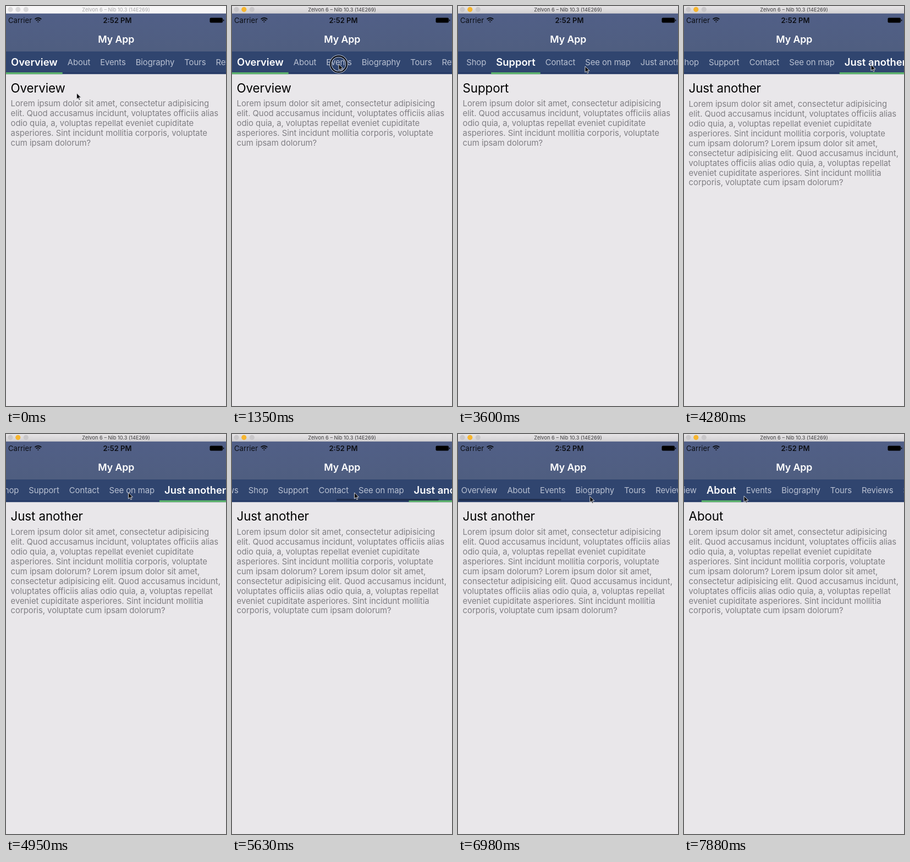
An HTML page for the animation above (8 s loop, 400 by 730 pixels).

```html
<!DOCTYPE html>
<html lang="en">
<head>
<meta charset="utf-8">
<title>Scrolling tabs</title>
<style>
  html, body { margin: 0; width: 100%; height: 100%; overflow: hidden; background: #e9e7ea; }
  svg { display: block; width: 100%; height: 100%; font-family: Inter, "Noto Sans", sans-serif; }
  .mid { text-anchor: middle; }
  .tab { font-size: 14.9px; letter-spacing: -.1px; fill: #b9c1d2; }
  .tab.on { font-size: 18.4px; font-weight: 600; letter-spacing: 0; fill: #fff; }
  .body { font-size: 14.9px; letter-spacing: -.05px; fill: #807f84; }
  .status { font-size: 13px; fill: #0b0d12; }
</style>
</head>
<body>
<svg viewBox="0 0 400 730">
  <defs>
    <linearGradient id="chrome" x2="0" y2="1">
      <stop stop-color="#e6e4e6"/><stop offset="1" stop-color="#d1cfd1"/>
    </linearGradient>
    <linearGradient id="nav" x2="0" y2="1">
      <stop stop-color="#515f87"/><stop offset="1" stop-color="#4f5e80"/>
    </linearGradient>
  </defs>

  <rect width="400" height="730" fill="#e9e7ea"/>
  <rect id="bar" width="400" height="14"/>
  <g id="lights"><circle cx="8" cy="6.3" r="4.6"/><circle cx="21.8" cy="6.3" r="4.6"/><circle cx="36.3" cy="6.3" r="4.6"/></g>
  <text id="window" class="mid" x="200" y="10" font-size="9.2">Zelvon 6 – Nib 10.3 (14E269)</text>

  <rect y="13.7" width="400" height="69.3" fill="url(#nav)"/>
  <text class="status" x="4" y="30.5" letter-spacing=".1">Carrier</text>
  <g fill="none" stroke="#0b0d12" stroke-width="1.9">
    <path d="M52.5 24.2a8.2 8.2 0 0 1 11.8 0M54.8 26.7a5 5 0 0 1 7.2 0"/>
    <path d="M56.7 28.3L58.4 30.3L60.1 28.3Z" fill="#0b0d12" stroke="none"/>
  </g>
  <text class="status mid" x="202.5" y="30.5" font-weight="600">2:52 PM</text>
  <rect x="370.5" y="21.5" width="23.5" height="9" rx="2"/>
  <rect x="394.8" y="24.4" width="1.5" height="3.4" rx=".7"/>
  <text class="mid" x="200.3" y="66.5" font-size="17.8" font-weight="600" letter-spacing="-.1" fill="#fff">My App</text>

  <rect y="83" width="400" height="41" fill="#30456f"/>
  <rect y="121.3" width="400" height="3" fill="#253a66"/>
  <g id="tabs"><rect id="underline" y="121" height="3.3" fill="#5bb36b"/></g>
  <rect id="indicator" y="118.6" height="2.8" rx="1.4" fill="#18243f"/>

  <text id="heading" x="8.6" y="158.3" font-size="22.4" letter-spacing="-.12"></text>
  <g id="lines"></g>

  <g id="cursor">
    <g id="ring" fill="none">
      <circle r="14.6" stroke="#dfe3ec" stroke-width="4.2"/>
      <circle r="14.6" stroke="#0c111c" stroke-width="2.6"/>
    </g>
    <path d="M0 0V11.2L2.6 8.8L4.4 12.8L6.2 12L4.4 8.1H8Z" fill="#0a0a0c" stroke="#e6e6ea" stroke-width=".9"/>
  </g>
</svg>
<script>
const LOOP = 8000, STEP = 225, WIDTH = 400, PAD = 9;

const TABS = ['Overview', 'About', 'Events', 'Biography', 'Tours', 'Reviews',
  'Shop', 'Support', 'Contact', 'See on map', 'Just another'];
const SHORT = [
  'Lorem ipsum dolor sit amet, consectetur adipisicing',
  'elit. Quod accusamus incidunt, voluptates officiis alias',
  'odio quia, a, voluptas repellat eveniet cupiditate',
  'asperiores. Sint incidunt mollitia corporis, voluptate',
  'cum ipsam dolorum?',
];
const LONG = [
  ...SHORT.slice(0, 4),
  'cum ipsam dolorum? Lorem ipsum dolor sit amet,',
  'consectetur adipisicing elit. Quod accusamus incidunt,',
  'voluptates officiis alias odio quia, a, voluptas repellat',
  'eveniet cupiditate asperiores. Sint incidunt mollitia',
  'corporis, voluptate cum ipsam dolorum?',
];

// Where the pointer is at each step, and what it does there
const STORY = [
  { step: 0, x: 128.5, y: 159 },
  { step: 2, x: 112, y: 172 },
  { step: 6.5, x: 194, y: 106, click: 'Events' },
  { step: 11.5, x: 191.5, y: 108, click: 'Tours' },
  { step: 14.5, x: 231, y: 110, click: 'Support' },
  { step: 18.5, x: 340, y: 107, click: 'Just another' },
  { step: 23.5, x: 222.5, y: 107, dragTo: 'Overview' },
  { step: 28, x: 302, y: 114 },
  { step: 33.84, x: 109, y: 113, click: 'About' },
];
const CLICK_SPAN = 2, DRAG_SPAN = 7.9;
const drag = STORY.find(s => s.dragTo);

const $ = id => document.getElementById(id);
const set = (el, attrs) => { for (const k in attrs) el.setAttribute(k, attrs[k]); };
const clamp = p => Math.min(1, Math.max(0, p));
const ease = p => (p = clamp(p), p * p * (3 - 2 * p));
const mix = (a, b, p) => a + (b - a) * p;
const sum = list => list.reduce((a, b) => a + b, 0);

function addText(parent, text, attrs) {
  const el = document.createElementNS('http://www.w3.org/2000/svg', 'text');
  el.textContent = text;
  set(el, attrs);
  return parent.appendChild(el);
}

const lines = LONG.map(() => addText($('lines'), '', { class: 'body', x: 8.6 }));
const labels = TABS.map(name => addText($('tabs'), name, {}));
const slots = style => labels.map(el => {
  set(el, { class: style });
  return el.getComputedTextLength() + 2 * PAD;
});
const narrow = slots('tab'), wide = slots('tab on');
const totalWidth = selected => sum(narrow) - narrow[selected] + wide[selected];

// Replays every click and drag up to step n
function stateAt(n) {
  const state = { selected: 0, offset: 0, long: false };
  for (const { step, click, dragTo } of STORY) {
    if (step > n || !(click || dragTo)) continue;
    const tab = TABS.indexOf(click || dragTo);
    const goal = Math.min(sum(narrow.slice(0, tab)), totalWidth(state.selected) - WIDTH);
    state.offset = mix(state.offset, goal, ease((n - step) / (click ? CLICK_SPAN : DRAG_SPAN)));
    if (click) state.selected = tab;
    state.long ||= state.selected === TABS.length - 1;
  }
  return state;
}

// The pointer rests, travels quickly, then waits for its next action
function pointerAt(n) {
  const i = STORY.findLastIndex(s => s.step <= n);
  const a = STORY[i], b = STORY[i + 1] || a;
  const p = a === b ? 0 : ease(((n - a.step) / (b.step - a.step) - .4) / .3);
  return [mix(a.x, b.x, p), mix(a.y, b.y, p)];
}

function drawTabs(n, { selected, offset }) {
  let x = -offset;
  labels.forEach((el, i) => {
    const on = i === selected, width = on ? wide[i] : narrow[i];
    set(el, { class: on ? 'tab on' : 'tab', x: x + PAD, y: on ? 109 : 108.2 });
    if (on) set($('underline'), { x, width });
    x += width;
  });
  const ratio = WIDTH / totalWidth(selected);
  const fade = clamp((n - drag.step - DRAG_SPAN) / 4);
  set($('indicator'), {
    x: offset * ratio, width: WIDTH * ratio,
    opacity: n < drag.step ? 0 : .75 * (1 - fade),
  });
}

function draw(n) {
  const active = n >= 6;
  set($('bar'), { fill: active ? 'url(#chrome)' : '#f6f5f6' });
  set($('window'), { fill: active ? '#3c3b3d' : '#a9a8aa' });
  [...$('lights').children].forEach((c, i) =>
    set(c, { fill: !active ? '#dad9da' : i === 1 ? '#f6b52f' : '#c9c7c9' }));

  const state = stateAt(n), copy = state.long ? LONG : SHORT;
  drawTabs(n, state);
  $('heading').textContent = TABS[state.selected];
  lines.forEach((el, i) => {
    el.textContent = copy[i] || '';
    set(el, { y: (state.long ? 184 : 183.4) + 17.93 * i });
  });

  set($('cursor'), { transform: `translate(${pointerAt(n)})` });
  const pressed = STORY.some(s => s.click && Math.floor(s.step) === n);
  set($('ring'), { visibility: pressed ? 'visible' : 'hidden' });
}

let shown = -1;
function tick() {
  const t = Math.floor(performance.now() % LOOP / 10) * 10;
  const n = Math.min(35, Math.floor(t / STEP));
  if (n !== shown) draw(shown = n);
  requestAnimationFrame(tick);
}
tick();
</script>
</body>
</html>
```
